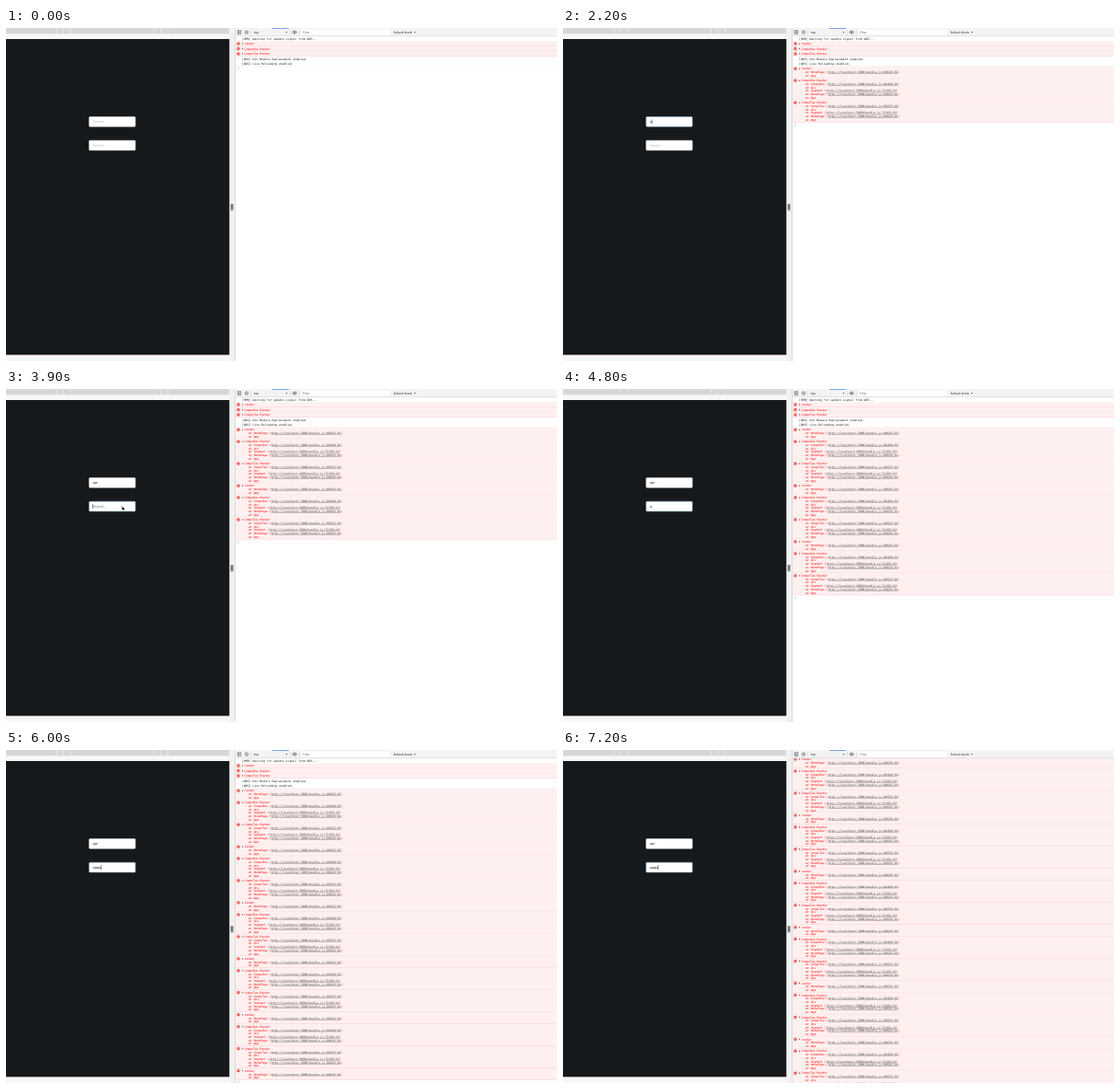
An HTML page with a canvas for the animation above (7.5 s loop, 600x362 px).

```html
<!DOCTYPE html>
<html lang="en">
<head>
<meta charset="utf-8">
<title>Render log</title>
<style>
  html, body { margin: 0; width: 100%; height: 100%; overflow: hidden; background: #fff; }
  canvas { display: block; }
</style>
</head>
<body>
<canvas width="600" height="362"></canvas>
<script>
const ctx = document.querySelector('canvas').getContext('2d');
const LOOP = 7500, ROW = 5.45, LINE = 3.71, LOG_TOP = 8.9, LOG_BOTTOM = 378;
const MONO = '"DejaVu Sans Mono", monospace', UI = 'Roboto, sans-serif', FORM = 'Lato, sans-serif';

function box(x, y, w, h, color) {
  ctx.fillStyle = color;
  ctx.fillRect(x, y, w, h);
}

// Set type at ten times the size and scale down, so tiny advances stay exact.
function text(str, x, y, size, font, color) {
  ctx.save();
  ctx.translate(x, y);
  ctx.scale(0.1, 0.1);
  ctx.font = `${size * 10}px ${font}`;
  ctx.textBaseline = 'alphabetic';
  ctx.textRendering = 'geometricPrecision';
  ctx.fillStyle = color;
  ctx.fillText(str, 0, 0);
  const width = ctx.measureText(str).width / 10;
  ctx.restore();
  return x + width;
}

function shape(points, x, y, fill, stroke) {
  ctx.beginPath();
  points.forEach(([px, py]) => ctx.lineTo(x + px, y + py));
  ctx.closePath();
  if (stroke) {
    ctx.strokeStyle = stroke;
    ctx.lineWidth = 0.9;
    ctx.stroke();
  }
  ctx.fillStyle = fill;
  ctx.fill();
}

function circle(x, y, r, fill, stroke) {
  ctx.beginPath();
  ctx.arc(x, y, r, 0, 7);
  if (fill) { ctx.fillStyle = fill; ctx.fill(); }
  if (stroke) { ctx.strokeStyle = stroke; ctx.lineWidth = 0.6; ctx.stroke(); }
}

// Console entries
const at = (name, pos) => [name, pos];
const page = [at('HomePage', '80645:81'), at('App')];
const inner = [at('div'), at('Segment', '72169:24'), ...page];
const group = [
  { title: 'render', stack: page },
  { title: 'CompoOne Render', stack: [at('CompoOne', '80489:81'), ...inner] },
  { title: 'CompoTwo Render', stack: [at('CompoTwo', '80555:81'), ...inner] }
];
const intro = [
  { info: '[HMR] Waiting for update signal from WDS...' },
  ...group.map(({ title }) => ({ title, stack: [] })),
  { info: '[WDS] Hot Module Replacement enabled.' },
  { info: '[WDS] Live Reloading enabled.' }
];
const entries = [...intro];
for (let i = 0; i < 6; i++) entries.push(...group);

// [time, number of logged entries after the intro]
const logTimes = [[2000, 3], [2600, 6], [4300, 9], [5000, 12], [5300, 15], [5900, 16], [6100, 18]];
// [time, text] for each field
const typed = [
  [[1900, 'q'], [2600, 'qw']],
  [[4300, 'q'], [5000, 'qq'], [5300, 'qqq'], [5700, 'qqqq']]
];
const caretResets = [1400, 1900, 2600, 2900, 3800, 4300, 5000, 5300, 5700, 6200];
const pointer = [
  [300, 255, 187], [400, 255, 187], [600, 208, 132], [700, 162, 96], [800, 134, 87],
  [900, 126, 104], [3300, 126, 104], [3700, 126, 127]
];

const latest = (list, t, start) => list.reduce((v, [time, next]) => t >= time ? next : v, start);
const heightOf = e => ROW + (e.stack ? e.stack.length * LINE : 0);

function drawEntry(e, y) {
  const h = heightOf(e), base = y + 3.85;
  if (e.info) {
    box(250, y + h - 0.4, 350, 0.4, '#eee');
    text(e.info, 257, base, 3.18, MONO, '#222');
    return;
  }
  box(250, y, 350, h, '#fff0f0');
  box(250, y + h - 0.5, 350, 0.5, '#ffc9c9');
  circle(253, y + 2.7, 1.7, '#e8453c');
  box(252.1, y + 2.45, 1.8, 0.5, '#fff');
  shape([[0, 0], [1.4, 0.9], [0, 1.8]], 257, y + 1.8, '#555');
  text(e.title, 259.5, base, 3.15, MONO, '#f00');
  e.stack.forEach(([name, pos], i) => {
    const b = base + (i + 1) * LINE;
    let x = text(`at ${name}${pos ? ' (' : ''}`, 264, b, 3.15, MONO, '#f00');
    if (!pos) return;
    const end = text(`http://localhost:3000/bundle.js:${pos}`, x, b, 3.15, MONO, '#444');
    box(x, b + 0.35, end - x, 0.35, '#555');
    text(')', end, b, 3.15, MONO, '#f00');
  });
}

function drawLog(t) {
  const shown = entries.slice(0, intro.length + latest(logTimes, t, 0));
  const height = shown.reduce((sum, e) => sum + heightOf(e), LOG_TOP + ROW);
  let y = LOG_TOP - Math.max(0, height - LOG_BOTTOM);
  box(250, 0, 350, 362, '#fff');
  for (const e of shown) {
    drawEntry(e, y);
    y += heightOf(e);
  }
  ctx.strokeStyle = '#4a86e8';
  ctx.lineWidth = 0.5;
  ctx.beginPath();
  ctx.moveTo(252.2, y + 1.4);
  ctx.lineTo(253.5, y + 2.6);
  ctx.lineTo(252.2, y + 3.8);
  ctx.stroke();
}

function drawToolbar() {
  box(250, 0, 350, 9, '#f3f3f3');
  box(250, 8.6, 350, 0.5, '#ccc');
  box(290, 0, 18, 0.7, '#4285f4');
  ctx.strokeStyle = '#555';
  ctx.lineWidth = 0.6;
  ctx.strokeRect(252.2, 2.8, 3.6, 3.6);
  shape([[0, 0], [1.7, 1.1], [0, 2.2]], 253.3, 3.5, '#555');
  circle(262, 4.6, 1.7, null, '#555');
  shape([[0, 0.4], [0.4, 0], [2.4, 2], [2, 2.4]], 260.8, 3.4, '#555');
  for (const x of [266, 309.5, 319]) box(x, 2, 0.5, 5.5, '#ccc');
  text('top', 270, 5.8, 3.5, UI, '#333');
  shape([[0, 0], [2, 0], [1, 1.6]], 304.5, 3.9, '#555');
  ctx.beginPath();
  ctx.ellipse(314.3, 4.6, 2.3, 1.5, 0, 0, 7);
  ctx.strokeStyle = '#555';
  ctx.stroke();
  circle(314.3, 4.6, 0.9, '#555');
  box(321, 1.5, 97, 6.3, '#fff');
  text('Filter', 323, 5.8, 3.4, UI, '#666');
  text('Default levels', 422, 5.8, 3.4, UI, '#333');
  shape([[0, 0], [2, 0], [1, 1.6]], 444.2, 3.9, '#555');
}

function drawField(index, t) {
  const x = 90.5, y = 96.5 + index * 25.7, w = 50.4, h = 10.8;
  const focused = index ? t >= 3800 : t >= 1400 && t < 3800;
  const value = latest(typed[index], t, '');
  ctx.beginPath();
  ctx.roundRect(x, y, w, h, 1.1);
  ctx.fillStyle = '#fff';
  ctx.fill();
  ctx.strokeStyle = focused ? '#85b7d9' : '#dededf';
  ctx.lineWidth = 0.5;
  ctx.stroke();
  const end = text(value || 'Search...', 94.5, y + 6.8, 4, FORM,
    value ? '#222' : focused ? '#777' : '#bbb');
  const since = t - Math.max(...caretResets.filter(r => r <= t));
  if (focused && since % 1000 < 500) box(value ? end : 94.3, y + 2.9, 0.5, 5, '#222');
}

function drawPage(t) {
  box(0, 0, 250, 362, '#f7f7f7');
  box(0, 0, 243, 6.3, '#d6d6d6');
  for (const x of [55, 62, 70, 161, 168, 176]) box(x, 0, 0.6, 6.3, '#f4f4f4');
  box(0, 12, 243.5, 343.3, '#16191b');
  box(0, 355.3, 243.5, 0.7, '#b9a0a4');
  box(243.5, 0, 6, 362, '#f1f1f1');
  box(249.4, 0, 0.6, 362, '#c8c8c8');
  box(244.6, 191, 3, 7.5, '#999');
  box(245.5, 192.2, 0.5, 5, '#444');
  box(246.5, 192.2, 0.5, 5, '#444');
  drawField(0, t);
  drawField(1, t);
}

function drawPointer(t) {
  if (!(t >= 300 && t < 1900 || t >= 3300 && t < 4300)) return;
  const next = pointer.findIndex(p => p[0] > t);
  const b = pointer[next < 0 ? pointer.length - 1 : next];
  const a = next < 0 ? b : pointer[next - 1];
  const k = a === b ? 0 : (t - a[0]) / (b[0] - a[0]);
  const arrow = [[0, 0], [0, 4.2], [1, 3.4], [1.7, 4.9], [2.4, 4.6], [1.7, 3.1], [3, 3]];
  shape(arrow, a[1] + (b[1] - a[1]) * k + 0.4, a[2] + (b[2] - a[2]) * k + 0.4, '#000', '#fff');
}

function frame(now) {
  const t = Math.floor(now % LOOP / 100) * 100;
  drawLog(t);
  drawToolbar();
  drawPage(t);
  drawPointer(t);
  requestAnimationFrame(frame);
}
frame(performance.now());
</script>
</body>
</html>
```
